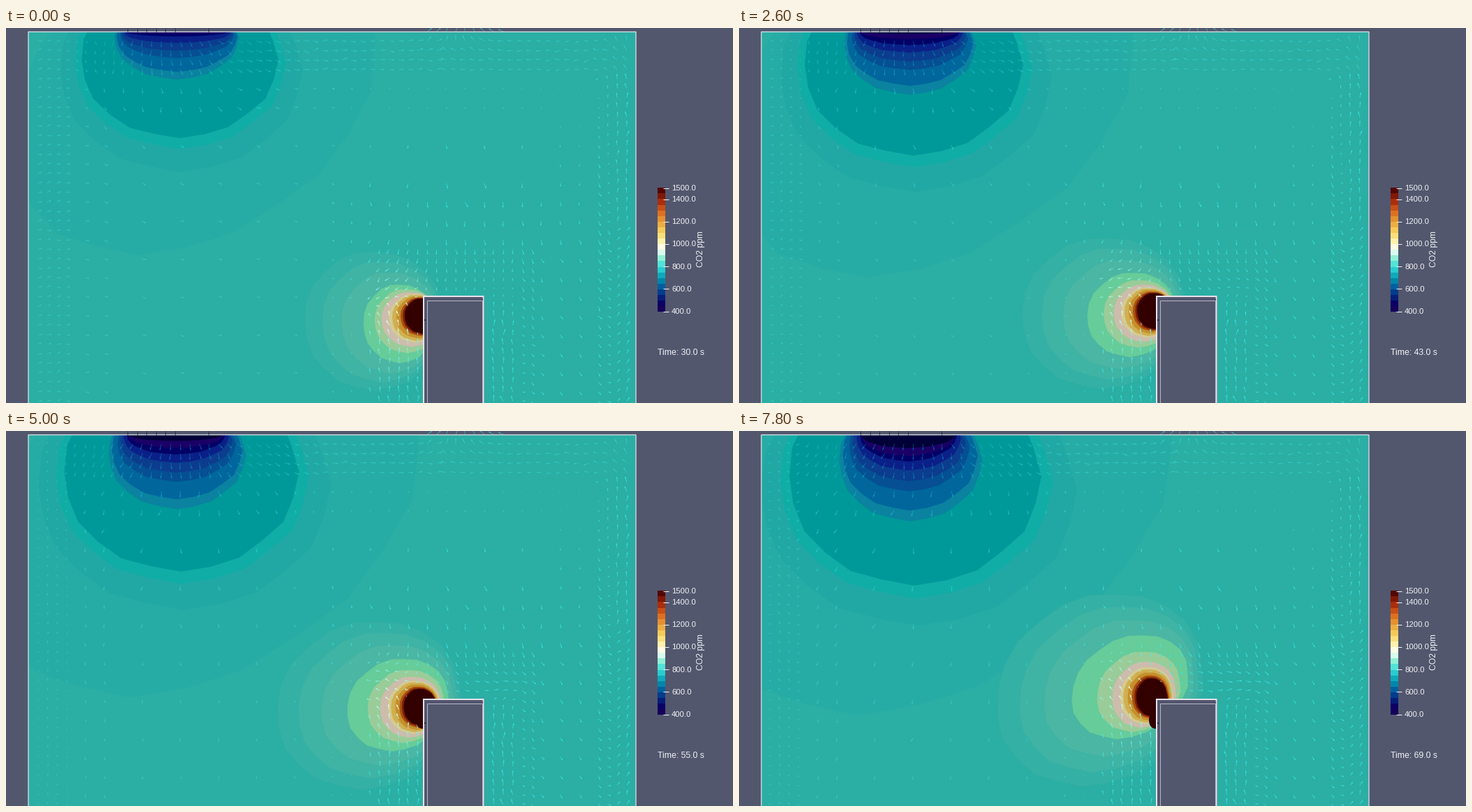
Write a matplotlib script that moves like this. It is 1041 by 538 pixels and loops after 8000 ms.

```python
import numpy as np
import matplotlib.pyplot as plt
from matplotlib.animation import FuncAnimation
from matplotlib.collections import PolyCollection
from matplotlib.colors import LinearSegmentedColormap
from matplotlib.patches import Polygon, Rectangle

W, H, DPI = 1041, 538, 64
FRAMES, STEP_MS = 40, 200
PX = 72 / DPI
BG = "#52576e"
INK = "#f2f2f4"
CELL = 13.6

# Ovals at the start and end of the loop: centre x, y, radius x, y, lean.
COLD = {
    "faint": [(270, 90, 248, 232, -.34), (290, 105, 310, 298, -.4)],
    "soft": [(250, 60, 171, 144, 0), (256, 85, 223, 191, 0)],
    "teal": [(248, 45, 139, 111, 0), (251, 65, 178, 154, 0)],
    "blue": [(244, 14, 88, 59, 0), (245, 42, 101, 86, 0)],
    "navy": [(245, 5, 73, 7, 0), (242, 5, 69, 38, 0)],
}
WARM = {
    "halo": [(528, 420, 100, 99, 0), (517, 371, 145, 137, -.17)],
    "green": [(564, 424, 52, 56, 0), (560, 367, 81, 74, -.25)],
    "pink": [(580, 418, 42, 39, 0), (580, 378, 45, 47, -.1)],
    "core": [(597, 413, 26, 25, 0), (591, 382, 22, 27, 0)],
}

# Bands from outside in: colour, outer oval, inner oval, blend.
COLD_BANDS = [
    ("#27aca5", "faint", "soft", 0), ("#21a8a5", "soft", "teal", 0),
    ("#10ada6", "soft", "teal", .68), ("#009999", "teal", "blue", 0),
    ("#0b82a0", "blue", "navy", 0), ("#00669c", "blue", "navy", .18),
    ("#054f92", "blue", "navy", .5), ("#0c3c8e", "blue", "navy", .67),
    ("#0a2088", "blue", "navy", .85), ("#000066", "navy", "navy", 0),
]
WARM_BANDS = [
    ("#34b0a4", "halo", "green", 0), ("#3fb3a4", "halo", "green", .3),
    ("#4bb6a3", "halo", "green", .63), ("#66cc99", "green", "pink", 0),
    ("#99cc99", "green", "pink", .62), ("#cdbcac", "pink", "core", 0),
    ("#d4cb91", "pink", "core", .32), ("#d0b050", "pink", "core", .46),
    ("#c68f2c", "pink", "core", .64), ("#a8500f", "pink", "core", .82),
    ("#7c1c06", "pink", "core", .92), ("#330000", "core", "core", 0),
]
SCALE = LinearSegmentedColormap.from_list("ppm", [
    (0, "#1a0055"), (.07, "#0a0066"), (.18, "#004c99"), (.27, "#0096af"),
    (.36, "#33dcd8"), (.45, "#a8f5d6"), (.5, "#ffffff"), (.55, "#fff9c0"),
    (.64, "#f8d560"), (.73, "#e8a038"), (.82, "#d8601a"), (.9, "#a02408"),
    (1, "#400000")])

ANGLES = np.linspace(0, 2 * np.pi, 24, endpoint=False)
rng = np.random.default_rng(4)
WOBBLE = 1 + rng.uniform(-.01, .025, len(ANGLES))


def outline(pose):
    cx, cy, rx, ry, lean = pose
    dy = ry * WOBBLE * np.sin(ANGLES)
    dx = rx * WOBBLE * np.cos(ANGLES) + lean * dy
    return np.column_stack([cx + dx, cy + dy])


def poses(shapes, bands, s, rise):
    """Oval of each band; sideways growth slows down, height follows rise."""
    ease = np.array([s ** .85, s ** rise, s ** .85, s ** rise, s ** rise])
    now = {k: a + (np.array(b) - a) * ease for k, (a, b) in shapes.items()}
    return [now[a] + (now[b] - now[a]) * f for _, a, b, f in bands]


def bump(x, centre, width):
    return np.exp(-((x - centre) / width) ** 2)


def flow(x, y, s):
    """Air velocity at a point; s runs from 0 to 1 over the loop."""
    left = 1 / (1 + np.exp((x - 440) / 25))
    low_right = (x > 735) * (y > 290)
    beside = 1 / (1 + np.exp((405 - y) / 14))
    terms = [
        # supply jet, ceiling, exhaust
        (1.3 * bump(x, 245, 95) * bump(y, 5, 125 + 70 * s), (x - 245) / 110, 1),
        (.8 * bump(y, 40, 26) * (x > 330), np.where(x < 620, 1, -1), .06),
        (1.4 * bump(x, 650, 55) * bump(y, 0, 32), (650 - x) / 45, -1),
        # above, beside and over the block
        (bump(x, 655, 130) * bump(y, 260, 90), .08 + .3 * s, 1),
        (1.5 * beside * (bump(x, 570, 42) + bump(x, 704, 26)), -.06, -1),
        (.9 * s * bump(x, 695, 60) * bump(y, 360, 24), 1, -.25),
        (.7 * bump(x, 550, 45) * bump(y, 360, 50), -.7, .45 - 1.3 * s),
        # walls
        (.8 * bump(x, 888, 24), .05, -1),
        (.7 * bump(x, 848, 14) * bump(y, 290, 130), .45, .9),
        (.2 + .45 * s * bump(x, 65, 35), 0, -.8 * bump(x, 60, 45)),
        # slow drift in the room
        (.4 * left, .8 * (1 - s) - .25 * s, .15 + .75 * s),
        (.4 * low_right, .55, .8),
    ]
    u = sum(w * a for w, a, _ in terms)
    v = sum(w * b for w, _, b in terms)
    return u, v


def glyph_points():
    """Grid that is finer near the walls and around the block."""
    pts = []
    for i in range(1, 64):
        for j in range(40):
            block = max(42 - i, i - 48, 28 - j)
            if block <= 0 or (j == 0 and not 42 <= i <= 50):
                continue
            d = min(i, 64 - i, j, block - 1)
            step = 1 if d <= 4 else 2 if d <= 9 else 4
            if i % step == 0 and j % step == 0:
                pts.append((32 + CELL * i, 5 + CELL * j))
    return np.array(pts)


PTS = glyph_points()
TURN = rng.normal(0, .16, len(PTS))


def glyphs(s):
    x, y = PTS.T
    u, v = flow(x, y, s)
    size = np.hypot(u, v) + 1e-6
    angle = np.arctan2(v, u) + TURN
    d = np.stack([np.cos(angle), np.sin(angle)], axis=1)
    n = np.stack([-d[:, 1], d[:, 0]], axis=1)
    length = (12.5 * size / (size + .35))[:, None]
    neck = PTS + .58 * length * d
    return np.stack([PTS - .4 * n, neck - .4 * n, neck - 1.2 * n,
                     PTS + length * d,
                     neck + 1.2 * n, neck + .4 * n, PTS + .4 * n], axis=1)


def glyph_colors(s):
    x, y = PTS.T
    warm = bump(x, 560, 48) * bump(y, 415 - 35 * s, 60)
    cold = bump(x, 245, 120) * bump(y, 5, 55 + 45 * s)
    col = np.tile([.2, .87, .85], (len(PTS), 1))
    col += (np.array([.92, 1, .93]) - col) * warm[:, None]
    col += (np.array([0, .5, .74]) - col) * cold[:, None]
    alpha = np.where((x < 450) | (y < 62), .6, 1)
    return np.column_stack([col, alpha])


fig = plt.figure(figsize=(W / DPI, H / DPI), dpi=DPI, facecolor=BG)
ax = fig.add_axes([0, 0, 1, 1])
ax.set_xlim(0, W)
ax.set_ylim(H, 0)
ax.axis("off")


def box(x, y, w, h, color, **kw):
    return ax.add_patch(Rectangle((x, y), w, h, fc=color, lw=0, **kw))


def line(xs, ys, color, width=1, z=5, snap=None):
    ax.plot(xs, ys, color=color, lw=width * PX, zorder=z, snap=snap,
            solid_joinstyle="miter", solid_capstyle="butt")


def frame(left, top, right, color, width, z, snap=None):
    line([left, left, right, right], [545, top, top, 545], color, width, z,
         snap)


def label(x, y, text, px, **kw):
    return ax.text(x, y, text, color=INK, family="Liberation Sans",
                   fontsize=px * PX, va="baseline", **kw)


room = box(32, 5.5, 870, 540, "#2baea4", zorder=1)


def layer(color, z):
    patch = ax.add_patch(Polygon([(0, 0), (1, 1), (1, 0)], fc=color, lw=0,
                                 zorder=z))
    patch.set_clip_path(room)
    return patch


# Room and plumes; the hot core hides the arrows
cold = [layer(b[0], 2) for b in COLD_BANDS]
deep = [layer("#1a0066", 2), layer("#000038", 2)]
warm = [layer(b[0], 3) for b in WARM_BANDS[:-1]]
core, tail = (layer(WARM_BANDS[-1][0], 4.5) for _ in range(2))
tail.set_xy(outline((596, 415, 9, 12, 0)))
arrows = ax.add_collection(PolyCollection([], lw=0, zorder=4))
frame(32, 5.5, 902, "#cfdade", 1.4, 5, False)
for vent in (174, 187.5, 201, 214.5, 228, 242, 290):
    line([vent, vent], [0, 6], "#25283c", .8, 6)

# Block
box(597, 384, 88, 160, BG, zorder=5)
frame(598, 385, 683.6, "#e6e3ea", 2, 6, False)
frame(600, 387.5, 682, "#575070", 1, 6)
frame(602.5, 390.5, 681.5, "#b9b6c3", 1, 6)
box(599, 418, 2, 2, "#2a1830", zorder=7)

# Colour scale
BANDS = 22
for k in range(BANDS):
    box(933, 407 - (k + 1) * 178 / BANDS, 11, 178 / BANDS + .3,
        SCALE((k + .5) / BANDS))
for value in (400, 600, 800, 1000, 1200, 1400, 1500):
    y = 406.5 - (value - 400) * 177 / 1100
    line([941, 949], [y, y], INK)
    label(953, y + 3.5, f"{value:.1f}", 11.2)
label(998, 343, "CO2 ppm", 12.1, rotation=90, rotation_mode="anchor")
clock = label(933, 469, "", 12.2)


def draw(i):
    s = i / (FRAMES - 1)
    cold_now = poses(COLD, COLD_BANDS, s, .85)
    warm_now = poses(WARM, WARM_BANDS, s, 1.35)
    for patch, pose in zip(cold + warm + [core], cold_now + warm_now):
        patch.set_xy(outline(pose))
    for patch, depth in zip(deep, (.45 + .35 * s, .5 * s)):
        patch.set_xy(outline(cold_now[-1] * [1, 1, .97, depth, 1]))
    arrows.set_verts(glyphs(s))
    arrows.set_facecolor(glyph_colors(s))
    clock.set_text(f"Time: {30 + i:.1f} s")
    return [*cold, *deep, *warm, core, arrows, clock]


anim = FuncAnimation(fig, draw, frames=FRAMES, interval=STEP_MS,
                     repeat=True, repeat_delay=0, blit=False)
plt.show()
```
